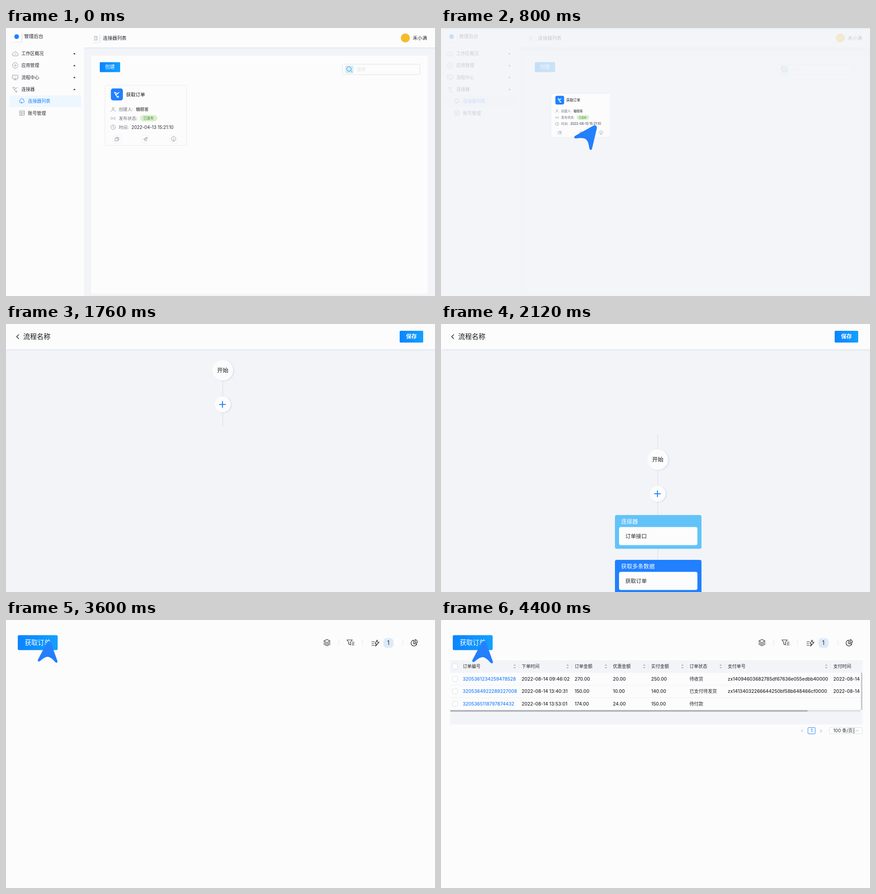
Write an HTML page that moves like this. It is 947x592 px and loops after 5000 ms.

```html
<!DOCTYPE html>
<html lang="zh">
<head>
<meta charset="utf-8">
<style>
html, body { margin: 0; width: 100%; height: 100%; overflow: hidden; background: #fcfcfc; }
svg { display: block; width: 947px; height: 592px; }
text { font-family: Inter, "Noto Sans CJK SC", "Noto Sans CJK", sans-serif; white-space: pre; }
</style>
</head>
<body>
<svg id="stage" viewBox="0 0 947 592" xmlns="http://www.w3.org/2000/svg"></svg>
<script>
const BLUE = '#2080ff', DARK = '#26282e', GREY = '#8b8f98', PALE = '#f3f4f8', WHITE = '#fcfcfc';

// Drawing helpers; text and icons are placed by their vertical middle.
const rect = (x, y, w, h, fill, r = 0, more = '') =>
  `<rect x="${x}" y="${y}" width="${w}" height="${h}" rx="${r}" fill="${fill}" ${more}/>`;
const frame = (x, y, w, h, r, color, fill = 'none') => rect(x, y, w, h, fill, r, `stroke="${color}"`);
const text = (x, y, s, size, fill = DARK, weight = 400, more = '') =>
  `<text x="${x}" y="${y + size * .365}" font-size="${size}" fill="${fill}" font-weight="${weight}" ${more}>${s}</text>`;
const path = (d, color = GREY, x = 0, y = 0, width = 1) =>
  `<path d="${d}" transform="translate(${x} ${y})" fill="none" stroke="${color}" stroke-width="${width}" stroke-linejoin="round" stroke-linecap="round"/>`;
const solid = (d, fill) => `<path d="${d}" fill="${fill}"/>`;
const circle = (x, y, r, fill, more = '') => `<circle cx="${x}" cy="${y}" r="${r}" fill="${fill}" ${more}/>`;
const group = (id, body) => `<g id="${id}">${body}</g>`;
const soft = 'filter="url(#soft)"';

const icons = {
  cloud: 'M-4 5H3.5A3 3 0 0 0 4-1A4.2 4.2 0 0 0-4-1.500A3.300 3.300 0 0 0-4 5ZM-2 2L0 0 2 2',
  gear: 'M-2.500-6H2.500L6-1.500V1.500L2.500 6H-2.500L-6 1.500V-1.500ZM2 0A2 2 0 1 0-2 0A2 2 0 1 0 2 0',
  board: 'M-6-5H6V3H-6ZM0 3V5.500M-3 5.500H3M-3-1H-2.500M0-1H.5M3-1H3.500',
  plug: 'M-5-5L2-2-2 1ZM-2 1L1 5M2-2L5-5M1 5A1.500 1.500 0 1 0 4 5A1.500 1.500 0 1 0 1 5',
  link: 'M-4-1A3.600 3.600 0 1 1 4-1A2.800 2.800 0 0 1 3 4M-4-1A2.800 2.800 0 0 0-3 4H1M-1 2L1 4-1 6',
  table: 'M-5-5H5V5H-5ZM-5-2H5M-2-2V5M-2 1.500H5',
  fold: 'M-4-4H4M0-1.300H4M0 1.300H4M-4 4H4M-2-1.500L-4 0-2 1.500',
  user: 'M-2-2A2 2 0 1 0 2-2A2 2 0 1 0-2-2M-5 5C-4 .5 4 .5 5 5',
  loop: 'M0 0C2-3 5-3 5 0S2 3 0 0S-5-3-5 0S-2 3 0 0',
  clock: 'M-5 0A5 5 0 1 0 5 0A5 5 0 1 0-5 0M0-3V.5L2 1.500',
  copy: 'M-4-2H2V4H-4ZM-2-2V-4H4V2H2',
  send: 'M4-4L-4 0 2 4ZM-1 1L4-4M-1 1V3',
  down: 'M-2 4A5 5 0 1 1 2 4M0-2V5M-2 3L0 5 2 3',
  stack: 'M0-7L7-3.500 0 0-7-3.500ZM-7 0L0 3.500 7 0M-7 3.300L0 7 7 3.300',
  filter: 'M-8-6H4L0-1V5L-4 3V-1ZM4-1H8M3 2H8M3 5H8',
  bolt: 'M4-7L-1 1H2L0 7 8-2H4ZM-8-3H-2M-8 1H-4M-8 5H-2',
  pie: 'M-1-6A6.500 6.500 0 1 0 6 2H-1ZM2-7V-1H7A5 5 0 0 0 2-7'
};
const icon = (name, x, y, color, width) => path(icons[name], color, x, y, width);

const menu = [['cloud', '工作区概况'], ['gear', '应用管理'], ['board', '流程中心'], ['plug', '连接器']];
const sidebar = rect(0, 0, 172, 592, WHITE) + rect(13, 9, 21, 21, '#fff', 4, soft) + circle(23.5, 19, 5.2, BLUE) +
  text(40, 18.5, '管理后台', 10.6, DARK, 500) +
  menu.map(([name, label], i) => {
    const y = 56.5 + i * 26.3;
    return icon(name, 20.5, y, GREY, .9) + text(34, y, label, 9.8) +
      solid(`M148.500 ${y + 1.5}L151 ${y - 1.5} 153.500 ${y + 1.5}Z`, '#222');
  }).join('') +
  rect(8, 149, 158, 25.5, '#eef7fd') + icon('link', 35, 161, BLUE) + text(48.500, 161.5, '连接器列表', 9.9, BLUE) +
  icon('table', 35.5, 188, GREY, .9) + text(48.500, 188, '账号管理', 9.9);

const dashboard = rect(0, 0, 947, 592, PALE) + rect(172, 0, 775, 43, WHITE, 0, soft) + sidebar +
  rect(190, 14, 16, 17, '#fff', 3, soft) + icon('fold', 198, 22.5, GREY, .9) +
  text(214, 22.5, '连接器列表', 10.4, DARK, 500) +
  circle(881.5, 22, 10, '#f6bb2b') + text(898, 22, '禾小满', 10.5, DARK, 500) +
  rect(188, 61, 743, 526, WHITE, 3) + rect(207, 75.5, 45, 22, 'url(#btn)', 2) + text(218.5, 86, '创建', 10.9, '#fff') +
  frame(742.5, 80, 171, 23, 2, '#dfe1e4', WHITE) + rect(749, 83, 18, 17, '#d3edfa', 2) +
  path('M5 0A5 5 0 1 0-5 0A5 5 0 1 0 5 0M3.800 3.800L7 7', '#358bb5', 757, 90.5) +
  text(774, 91, '搜索', 10, '#e4e6ea');

const card = frame(218.5, 126.5, 180, 133, 3, '#e9ebef', '#fcfcfd') + rect(231.5, 133.5, 26.5, 26.500, BLUE, 5) +
  icon('plug', 244.5, 147, '#fff', 1.6) + text(265, 147, '获取订单', 10.500, '#15171c', 500) +
  [['user', 179.5, '创建人:'], ['loop', 199.5, '发布状态:'], ['clock', 219, '时间:']]
    .map(([name, y, label]) => icon(name, 236.5, y, GREY, .9) + text(249, y, label, 9.6, '#70747c')).join('') +
  text(287, 179.500, '糖糕客', 9.3) + rect(296, 192.5, 38, 13.5, '#d5f0c6', 6.5) + text(303.5, 199.5, '已发布', 7.500, '#4f7d43') +
  text(277, 219, '2022-04-13 15:21:10', 9.7) +
  ['copy', 'send', 'down'].map((name, i) => {
    const x = 245 + i * 62.5;
    return frame(x - 8.5, 237, 17, 17, 3, '#f0f1f4') + icon(name, x, 245.500, GREY, .9);
  }).join('');

const step = (y, color, title, label) => rect(384, y, 191, 74.5, color, 4) +
  text(397.500, y + 14, title, 12.4, '#fff', 500) + rect(393, y + 26.500, 173, 40, WHITE, 4) + text(407, y + 46.5, label, 11.8);
const vline = (y1, y2) => path(`M478.500 ${y1}V${y2}`, '#dde0e8', 0, 0, 1.3);
const nodes = group('link', vline(124, 222)) + circle(478.5, 100.5, 22.8, WHITE, soft) +
  text(478.5, 100.500, '开始', 12.5, '#15171c', 400, 'text-anchor="middle"') +
  circle(478.3, 176, 17.5, WHITE, soft) + path('M-6.500 0H6.500M0-6.500V6.500', BLUE, 477.8, 176, 2.1) +
  group('steps', vline(45, 77) + vline(298, 322) +
    step(223, '#62c3f9', '连接器', '订单接口') + step(322, BLUE, '获取多条数据', '获取订单'));
const topbar = rect(0, 0, 947, 56, WHITE, 0, soft) +
  group('barText', path('M2-4.500L-2.500 0 2 4.500', DARK, 26, 28, 1.5) + text(38, 28, '流程名称', 15, '#15171c', 500) +
    rect(869, 15, 52, 26, 'url(#btn)', 2) + text(883, 28, '保存', 12, '#fff', 700));
const flow = rect(0, 0, 947, 592, PALE) + group('nodes', nodes) + group('topbar', topbar);

const orders = rect(0, 0, 947, 592, WHITE) + rect(26, 33.5, 88, 33, 'url(#btn)', 3) + text(41.5, 50, '获取订单', 14.3, '#fff') +
  icon('stack', 708.5, 50, DARK, 1.2) + icon('filter', 760.5, 50, DARK, 1.2) + icon('bolt', 815.5, 51, DARK, 1.2) +
  icon('pie', 901, 50.500, DARK, 1.3) + rect(833, 40, 22.5, 21.500, '#ddebf9', 8) +
  text(844, 50.5, '1', 13, DARK, 400, 'text-anchor="middle"') +
  [734.5, 786.5, 876].map(x => path(`M${x} 45V56`, '#e4e6ea')).join('');

const columns = [48, 178, 295, 379.5, 464, 548.500, 633, 866];
const heads = ['订单编号', '下单时间', '订单金额', '优惠金额', '实付金额', '订单状态', '支付单号', '支付时间'];
const rows = [
  ['3205361234259478528', '2022-08-14 09:46:02', '270.00', '20.00', '250.00', '待收货', 'zx14094603682785df67636e055edbb40000', '2022-08-14'],
  ['3205364922289227008', '2022-08-14 13:40:31', '150.00', '10.00', '140.00', '已支付待发货', 'zx14134032266644250bf58b648466cf0000', '2022-08-14'],
  ['3205365118797874432', '2022-08-14 13:53:01', '174.00', '24.00', '150.00', '待付款', '', '']
];
const checkbox = y => frame(25.5, y - 5.5, 11, 11, 2, '#dcdee2', '#fff');
const table = rect(20, 89, 910.5, 27.500, PALE) + checkbox(102.5) +
  columns.map((x, i) => {
    const end = columns[i + 1];
    return text(x, 102.5, heads[i], 9.8, DARK, 500) + (end ? path(`M${end - 6.500} 97V108`, '#e2e4e8') +
      solid(`M${end - 18.5} 101L${end - 15.5} 97.500 ${end - 12.500} 101ZM${end - 18.5} 104L${end - 15.5} 107.500 ${end - 12.5} 104Z`, '#b9bcc2') : '');
  }).join('') +
  rows.map((cells, r) => {
    const y = 130 + r * 27.5;
    return checkbox(y) + path(`M20 ${y + 14}H927`, '#eff0f3') +
      cells.map((s, c) => text(columns[c], y, s, 10.15, c ? DARK : BLUE, 500)).join('');
  }).join('') +
  rect(20, 203, 910.5, 27.5, PALE) + rect(20, 199, 907, 3.500, '#dcdfe3', 1.7) + rect(20, 199, 789.5, 3.5, '#afb2b7', 1.7) +
  rect(927, 116, 3.2, 83, '#c6c8cc', 1.6) +
  path('M2-3L-2 0 2 3', '#a5a8ae', 797, 245) + frame(810, 237.5, 16, 14, 1.5, BLUE) +
  text(818, 244.500, '1', 10, BLUE, 500, 'text-anchor="middle"') + path('M-2-3L2 0-2 3', '#a5a8ae', 839, 245) +
  frame(857.5, 237.5, 72.5, 13.5, 1.5, '#dcdee2', '#fff') + text(866, 244.5, '100 条/页', 10) +
  path('M911.500 239V250', DARK) + path('M-3-2L0 2 3-2', '#b5b8be', 919, 244.500);

const arrow = solid('M-4.500 3Q0-3 4.500 3L22.500 44Q24 50.500 18 47.500Q7 36 0 36T-18 47.500Q-24 50.500-22.500 44Z', 'url(#arrow)');

document.getElementById('stage').innerHTML = `<defs>
  <linearGradient id="btn"><stop stop-color="#0a84ff"/><stop offset="1" stop-color="#14a0ff"/></linearGradient>
  <linearGradient id="arrow" x2="0" y2="1"><stop stop-color="#2583ff"/><stop offset="1" stop-color="#217cfb"/></linearGradient>
  <filter id="soft" x="-30%" y="-30%" width="160%" height="160%">
    <feDropShadow dy="1" stdDeviation="1.6" flood-color="#2f6fc0" flood-opacity=".16"/></filter></defs>` +
  group('flow', flow) + group('dashboard', dashboard) + group('card', card) +
  group('orders', orders) + group('table', table) + group('cursor', arrow);

const el = {};
document.querySelectorAll('g[id]').forEach(g => el[g.id] = g);

const span = (t, a, b) => Math.min(1, Math.max(0, (t - a) / (b - a)));
const ease = (t, a, b) => (1 - Math.cos(Math.PI * span(t, a, b))) / 2;
const mix = (a, b, p) => a + (b - a) * p;
const move = (g, x, y) => g.setAttribute('transform', `translate(${x} ${y})`);
const fade = (g, o) => {
  g.setAttribute('opacity', o);
  g.style.display = o > 0 ? '' : 'none';
};

// Position, scale, angle and opacity of the pointer.
function pointer(t, cx, cy) {
  if (t < 600) {
    const p = ease(t, 40, 560);
    return [mix(-50, 350, p), mix(226, 220, p), 1.12, 37, t > 0 ? 1 : 0];
  }
  if (t < 1760) {
    const p = ease(t, 600, 960);
    return [cx + mix(42, 28, p), cy + mix(27, 20, p), mix(1.12, .98, p), 37, 1 - span(t, 1400, 1600)];
  }
  if (t < 2960) {
    const p = ease(t, 2120, 2280);
    return [mix(922, 899, p), mix(600, 27, p), .98, 3, 1 - span(t, 2320, 2520)];
  }
  const p = 1 - (1 - span(t, 3000, 3160)) ** 2;
  const press = Math.sin(Math.PI * span(t, 3280, 3640));
  return [mix(1, 95, p), mix(190, 46, p) + press * 3, 1 - press * .14, 4, t < 3000 ? 0 : 1];
}

function draw(t) {
  fade(el.dashboard, 1 - ease(t, 600, 880));

  const drag = ease(t, 820, 1500);
  const cx = mix(308.5, 478, drag), cy = mix(193, 183, drag);
  const size = mix(1, .536, ease(t, 600, 960)) * (1 - .9 * ease(t, 1280, 1520));
  el.card.setAttribute('transform', `translate(${cx} ${cy}) scale(${size}) translate(-308.5 -193)`);
  el.card.style.filter = t > 880 ? `blur(${2 * ease(t, 880, 1080)}px)` : 'none';
  fade(el.card, 1 - span(t, 1360, 1520));

  const bar = ease(t, 940, 1300);
  move(el.topbar, 0, mix(-56, 0, bar));
  fade(el.barText, Math.min(1, bar * 1.35));
  fade(el.nodes, ease(t, 840, 1080));
  move(el.nodes, 0, 199 * ease(t, 1740, 2080));
  move(el.link, 0, mix(12, 0, ease(t, 1000, 1240)));
  fade(el.steps, ease(t, 1760, 2040));

  fade(el.orders, ease(t, 2300, 2720));
  fade(el.table, t < 4040 ? 0 : 1);
  move(el.table, 0, 503 * (1 - ease(t, 4020, 4400)));

  const [x, y, scale, angle, o] = pointer(t, cx, cy);
  el.cursor.setAttribute('transform', `translate(${x} ${y}) rotate(${angle}) scale(${scale})`);
  fade(el.cursor, o);
}

const start = performance.now();
function tick() {
  const t = (performance.now() - start) % 5000;
  draw(Math.floor(t / 40) * 40);
  requestAnimationFrame(tick);
}
tick();
</script>
</body>
</html>
```
